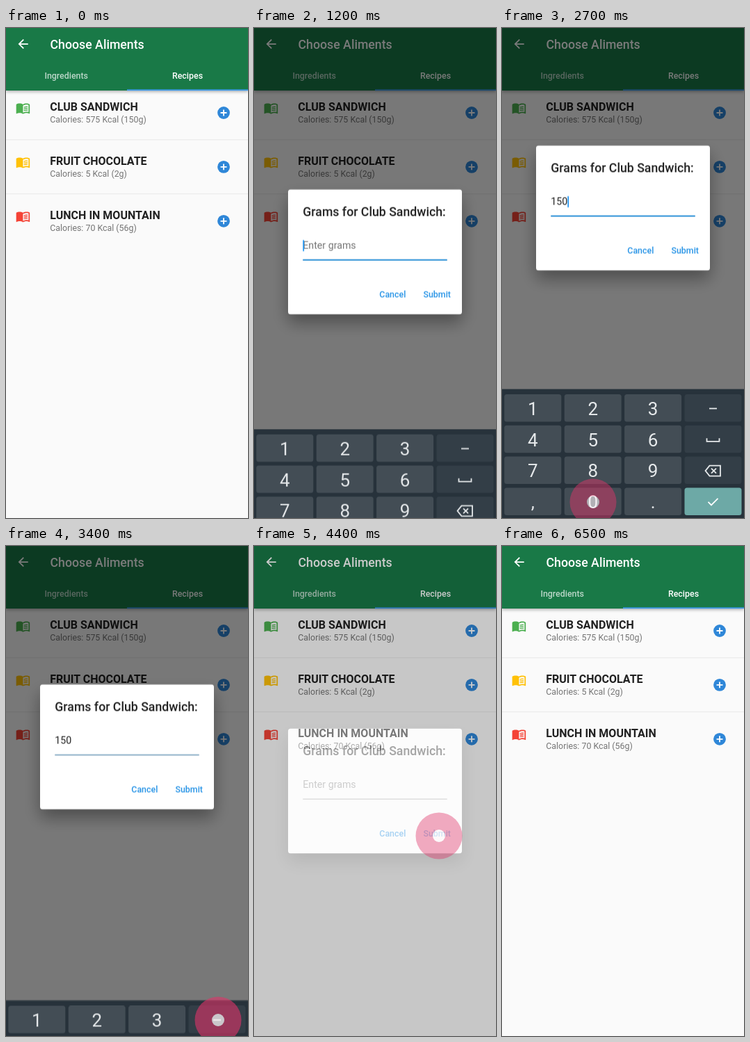
An HTML page that plays this animation: 348x705 px, repeating every 6700 ms.

```html
<!DOCTYPE html>
<html lang="en">
<head>
<meta charset="utf-8">
<title>Choose Aliments</title>
<style>
  html, body { margin: 0; width: 100%; height: 100%; overflow: hidden; background: #fafafa; }
  svg { display: block; width: 100vw; height: 100vh; font-family: Roboto, sans-serif; }
  .title { font-size: 17.72px; font-weight: 500; }
  .small { font-size: 12.4px; }
  .medium { font-weight: 500; }
  .mid { text-anchor: middle; }
  .name { font-size: 16px; font-weight: 700; fill: #212121; }
  .input { font-size: 14.2px; }
  .key { font-size: 26px; fill: #e6e9eb; }
  .glyph { fill: none; stroke: #e6e9eb; stroke-width: 1.8; }
  .bar { filter: drop-shadow(0 2px 2px rgba(0,0,0,.28)); }
  .card { filter: drop-shadow(0 12px 12px rgba(0,0,0,.36)); }

  .anim { animation: 6700ms linear infinite; }
  .modal { animation-name: modal; }
  .dialog { animation-name: dialog; }
  .keyboard { animation-name: keyboard; }
  .focus { animation-name: focus; }
  .hint { animation-name: hint; }
  .d1 { animation-name: d1; }
  .d2 { animation-name: d2; }
  .d3 { animation-name: d3; }
  .caret { animation-name: caret; }
  .d1, .d2, .d3, .caret { animation-timing-function: step-end; }
  .toast { animation-name: toast; }
  .tap { animation-name: tap; }
  .press { animation-name: press; }

  @keyframes modal {
    0%, 11.34% { opacity: 0; }
    13.58%, 63.88% { opacity: 1; }
    66.87%, 100% { opacity: 0; }
  }
  @keyframes dialog {
    0%, 17.61% { transform: translateY(0); animation-timing-function: ease-out; }
    19.1%, 50.45% { transform: translateY(-93.5px); animation-timing-function: ease-out; }
    51.94%, 100% { transform: translateY(0); }
  }
  @keyframes keyboard {
    0%, 16.42% { transform: translateY(186px); animation-timing-function: ease-out; }
    19.4%, 49.25% { transform: translateY(0); }
    51.34%, 100% { transform: translateY(186px); }
  }
  @keyframes focus {
    0%, 13.43% { opacity: 0; }
    14.93%, 49.25% { opacity: 1; }
    51.49%, 100% { opacity: 0; }
  }
  @keyframes hint {
    0%, 26.86% { opacity: 1; }
    26.87%, 63.58% { opacity: 0; }
    65.97%, 100% { opacity: 1; }
  }
  @keyframes d1 { 0% { opacity: 0; } 26.87% { opacity: 1; } 63.73%, 100% { opacity: 0; } }
  @keyframes d2 { 0% { opacity: 0; } 32.09% { opacity: 1; } 63.73%, 100% { opacity: 0; } }
  @keyframes d3 { 0% { opacity: 0; } 38.81% { opacity: 1; } 63.73%, 100% { opacity: 0; } }
  @keyframes caret {
    0% { opacity: 0; transform: translateX(0); }
    12.69% { opacity: 1; transform: translateX(0); }
    20.15% { opacity: 0; transform: translateX(0); }
    26.87% { opacity: 1; transform: translateX(8px); }
    32.09% { opacity: 1; transform: translateX(16px); }
    38.81% { opacity: 1; transform: translateX(24px); }
    46.27%, 100% { opacity: 0; transform: translateX(24px); }
  }
  @keyframes toast {
    0%, 67.16% { opacity: 0; }
    69.4%, 94.78% { opacity: 1; }
    96.72%, 100% { opacity: 0; }
  }
  @keyframes tap {
    0%, 2.24% { opacity: 1; }
    5.97%, 100% { opacity: 0; }
  }
  @keyframes press {
    0%, 2.4% { opacity: 1; }
    3.6%, 100% { opacity: 0; }
  }
</style>
</head>
<body>
<svg viewBox="0 0 348 705" preserveAspectRatio="none">
  <defs>
    <g id="book">
      <path d="M21 5c-1.1-.35-2.3-.5-3.5-.5-1.95 0-4.05.4-5.5 1.5-1.45-1.1-3.55-1.5-5.5-1.5S2.45 4.9 1 6v14.65c0 .25.25.5.5.5l.25-.05C3.1 20.45 5.05 20 6.5 20c1.95 0 4.05.4 5.5 1.5 1.35-.85 3.8-1.5 5.5-1.5 1.65 0 3.35.3 4.75 1.05l.25.05c.25 0 .5-.25.5-.5V6c-.6-.45-1.25-.75-2-1zm0 13.5c-1.1-.35-2.3-.5-3.5-.5-1.7 0-4.15.65-5.5 1.5V8c1.35-.85 3.8-1.5 5.5-1.5 1.2 0 2.4.15 3.5.5z"/>
      <path d="M13.5 10.8q3-1.4 6-.8M13.5 13.5q3-1.4 6-.8M13.5 16.2q3-1.4 6-.8" fill="none" stroke="currentColor" stroke-width="1.5"/>
    </g>
    <g id="add">
      <circle r="8.9" fill="#2f87d8"/>
      <path d="M-4.45 0h8.9M0-4.45v8.9" stroke="#fff" stroke-width="1.8"/>
    </g>
  </defs>

  <rect width="348" height="705" fill="#fafafa"/>
  <g id="list"></g>

  <rect class="bar" width="348" height="90" fill="#197947"/>
  <path transform="translate(14 12.4) scale(.886)" fill="#fff" d="M20 11H7.83l5.59-5.59L12 4l-8 8 8 8 1.41-1.41L7.83 13H20z"/>
  <text class="title" x="63.5" y="29.6" fill="#fff">Choose Aliments</text>
  <text class="small medium mid" x="86.7" y="72.6" fill="#fff" fill-opacity=".7">Ingredients</text>
  <text class="small medium mid" x="261" y="72.6" fill="#fff">Recipes</text>
  <rect x="174" y="88.3" width="174" height="1.9" fill="#3f9be8"/>

  <g class="anim modal">
    <rect width="348" height="705" fill="#000" fill-opacity=".52"/>
    <g class="anim dialog">
      <rect class="card" x="49" y="262.8" width="250" height="179.4" rx="3.5" fill="#fff"/>
      <text class="title" x="70.3" y="300.8" fill="#212121">Grams for Club Sandwich:</text>
      <text class="input anim hint" x="70.3" y="348" fill="#757575">Enter grams</text>
      <g class="input" fill="#212121">
        <text class="anim d1" x="70.3" y="348">1</text>
        <text class="anim d2" x="78.3" y="348">5</text>
        <text class="anim d3" x="86.3" y="348">0</text>
      </g>
      <rect class="anim caret" x="70.3" y="335.5" width="1.8" height="16" fill="#2196f3"/>
      <rect x="70.3" y="363.6" width="207.4" height="1" fill="#8a8a8a"/>
      <rect class="anim focus" x="70.3" y="363.2" width="207.4" height="1.8" fill="#2f9be6"/>
      <g class="small medium" fill="#2693e6">
        <text x="180.3" y="418">Cancel</text>
        <text x="243.5" y="418">Submit</text>
      </g>
    </g>
  </g>

  <g class="anim keyboard" id="keyboard">
    <rect y="519.5" width="348" height="186" fill="#27323b"/>
  </g>

  <g class="anim toast">
    <rect x="112" y="639" width="124" height="35" rx="17.5"/>
    <text class="mid" x="174.2" y="661.2" font-size="12.7" fill="#fff">Ingredient added</text>
  </g>
  <g id="taps"></g>
</svg>
<script>
  const LOOP = 6700;
  const put = (id, markup) => document.getElementById(id).insertAdjacentHTML('beforeend', markup);
  // A negative delay starts the shared keyframes at the given time in the loop.
  const startAt = ms => `style="animation-delay:${ms - LOOP}ms"`;

  const recipes = [
    ['CLUB SANDWICH', '575 Kcal (150g)', '#4caf50'],
    ['FRUIT CHOCOLATE', '5 Kcal (2g)', '#ffc107'],
    ['LUNCH IN MOUNTAIN', '70 Kcal (56g)', '#f44336']
  ];
  recipes.forEach(([name, info, color], i) => put('list', `
    <g transform="translate(0 ${i * 77.9})">
      <use href="#book" transform="translate(13.8 104.6) scale(.886)" fill="${color}" color="${color}"/>
      <text class="name" x="63.3" y="118.8">${name}</text>
      <text class="small" x="63.3" y="136.3" fill="#757575">Calories: ${info}</text>
      <use href="#add" x="313" y="122"/>
      ${i < 2 ? '<rect y="160.3" width="348" height="1" fill="#e9e9e9"/>' : ''}
    </g>`));

  const pressed = { 1: 1680, 5: 1980, 0: 2450 };
  const glyphs = [
    '<path d="M-5.5 0h11"/>',
    '<path d="M-9-2v4.5h18V-2"/>',
    '<path d="M-11 0l6-7.5H10.500v15H-5zM-2.500-3.500l7 7m0-7l-7 7"/>',
    '<path d="M-7 0l4.500 4.500L7-5" stroke="#fff"/>'
  ];
  ['123', '456', '789', ',0.'].forEach((row, r) => {
    for (let c = 0; c < 4; c++) {
      const x = 3.3 + c * 86.4, y = 527 + r * 44.8, label = row[c];
      const box = (fill, extra = '') =>
        `<rect x="${x}" y="${y}" width="82" height="39.5" rx="3.5" fill="${fill}" ${extra}/>`;
      put('keyboard', box(c < 3 ? '#434d55' : r < 3 ? '#333e47' : '#6da9a6'));
      if (label in pressed) put('keyboard', box('#5e6a70', 'class="anim press" ' + startAt(pressed[label])));
      put('keyboard', label
        ? `<text class="key mid" x="${x + 41}" y="${y + 29.8}">${label}</text>`
        : `<g class="glyph" transform="translate(${x + 41} ${y + 20.5})">${glyphs[r]}</g>`);
    }
  });

  const taps = [
    [315, 128, 690], [56, 548, 1680], [131, 593, 2010],
    [131, 682, 2450], [305, 682, 3190], [266, 417, 4130]
  ];
  taps.forEach(([x, y, ms]) => put('taps', `
    <g class="anim tap" ${startAt(ms)}>
      <circle cx="${x}" cy="${y}" r="33.5" fill="#e0356a" fill-opacity=".8"/>
      <circle cx="${x}" cy="${y}" r="9" fill="#fff" fill-opacity=".95"/>
    </g>`));
</script>
</body>
</html>
```
